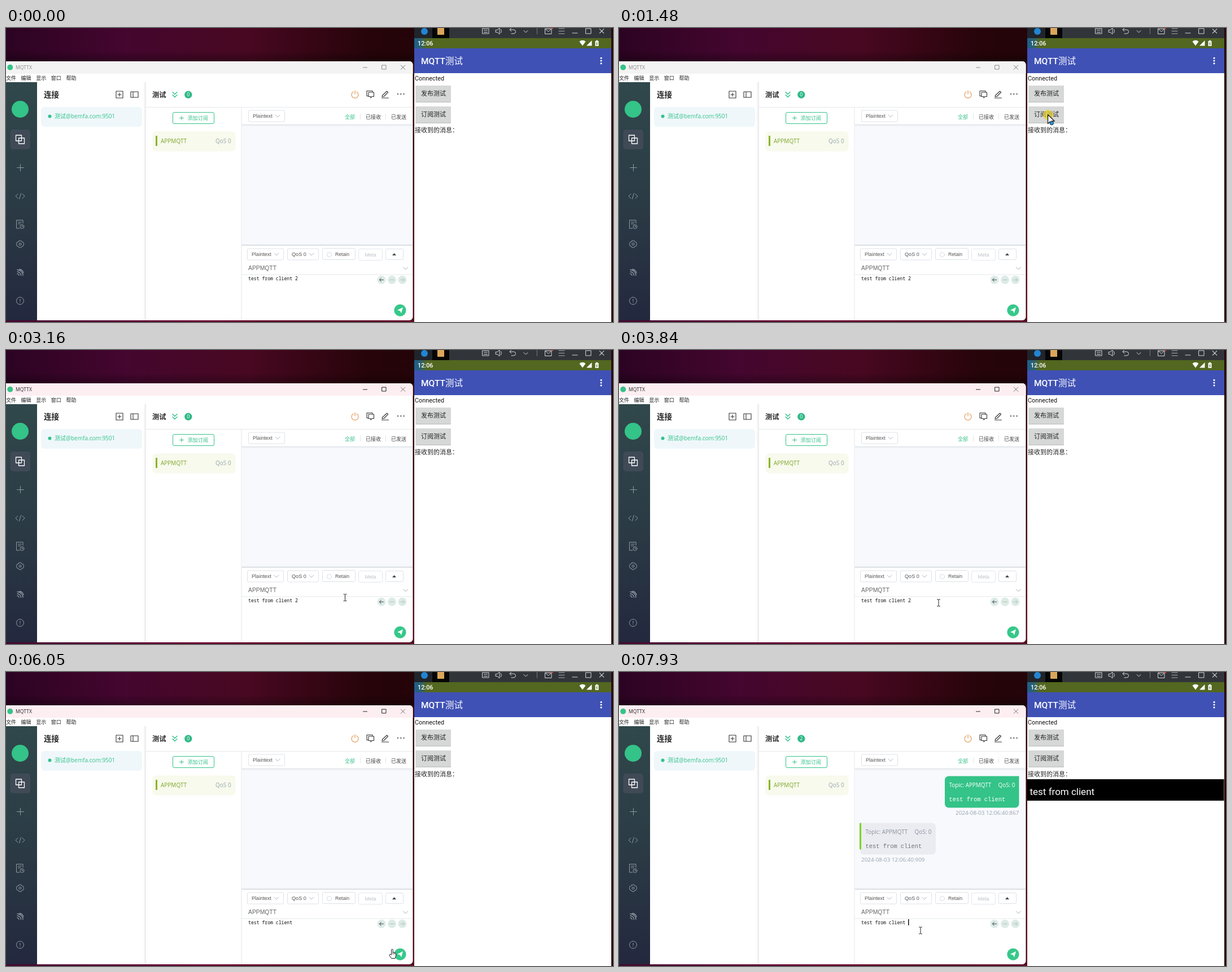
Recreate the animation shown at these times as an HTML page with a canvas. Size 1075 by 521 pixels, loop 8000 ms.

```html
<!DOCTYPE html>
<html lang="zh">
<head>
<meta charset="utf-8">
<title>MQTT</title>
<style>
html, body { margin: 0; width: 100%; height: 100%; overflow: hidden; background: #2a0512; }
canvas { display: block; }
</style>
</head>
<body>
<canvas id="stage" width="1075" height="521"></canvas>
<script>
const c = document.getElementById('stage').getContext('2d');
const LOOP = 8000;
const CJK = '"Noto Sans CJK SC", "Noto Sans CJK", sans-serif';
const UI = '"Open Sans", ' + CJK;
const ARIAL = '"Liberation Sans", ' + CJK;
const PHONE = 'Roboto, ' + CJK;
const CODE = '"Noto Sans Mono", monospace';
const COURIER = '"Liberation Mono", monospace';
const GREEN = '#34c388', INK = '#262626', GREY = '#8f9ba3';

// ---------- drawing helpers ----------
function rect(x, y, w, h, color) {
  c.fillStyle = color;
  c.fillRect(x, y, w, h);
}
function box(x, y, w, h, r, fill, line) {
  c.beginPath();
  c.roundRect(x, y, w, h, r);
  if (fill) { c.fillStyle = fill; c.fill(); }
  if (line) { c.strokeStyle = line; c.lineWidth = 1; c.stroke(); }
}
function dot(x, y, r, color) {
  c.beginPath();
  c.arc(x, y, r, 0, 7);
  c.fillStyle = color;
  c.fill();
}
function icon(x, y, path, color, width = 1, fill) {
  c.save();
  c.translate(x, y);
  const p = new Path2D(path);
  if (fill) { c.fillStyle = fill; c.fill(p); }
  if (color) {
    c.strokeStyle = color;
    c.lineWidth = width;
    c.lineCap = c.lineJoin = 'round';
    c.stroke(p);
  }
  c.restore();
}
function text(str, x, y, size, color, family = UI, weight = 400, align = 'left') {
  c.font = `${weight} ${size}px ${family}`;
  c.fillStyle = color;
  c.textAlign = align;
  c.fillText(str, x, y);
}
function ramp(x0, y0, x1, y1, ...colors) {
  const g = c.createLinearGradient(x0, y0, x1, y1);
  colors.forEach((color, i) => g.addColorStop(i / (colors.length - 1), color));
  return g;
}

const CHEVRON = 'M-4-2L0 2 4-2';
const CROSS = 'M-3.7-3.7L3.7 3.7M3.7-3.7L-3.7 3.7';
const PLUS = 'M-6 0H6M0-6V6';

// ---------- desktop and left window ----------
function desktop() {
  rect(0, 0, 1075, 521, ramp(0, 0, 1075, 0, '#2c0322', '#45062f', '#480821', '#260409', '#210508', '#290509'));
  rect(0, 40, 723, 19, ramp(0, 40, 0, 59, 'rgba(0,0,0,0)', 'rgba(0,0,0,.3)'));
  rect(0, 518, 723, 3, ramp(0, 0, 723, 0, '#43092e', '#5a0b36', '#6b0b32', '#5c0a26', '#64102a'));
  rect(720, 59, 3, 462, ramp(0, 59, 0, 521, '#2a0508', '#3b090d', '#5a1020'));
}

function titleBar(active) {
  box(-8, 59, 728.5, 459, 6, '#fff');
  box(-8, 59, 728.5, 22, [0, 6, 0, 0], active ? '#fdeef2' : '#f3f3f3');
  const ink = active ? '#222' : '#888';
  dot(7.3, 69.8, 5, GREEN);
  text('MQTTX', 17, 73, 8.6, ink);
  icon(636, 70, 'M-3.5 0H3.5', ink);
  icon(669.5, 69.5, 'M-3.5-3.5h7v7h-7z', ink);
  icon(703, 69.7, CROSS, '#777');
  ['文件', '编辑', '显示', '窗口', '帮助'].forEach((label, i) =>
    text(label, i * 26.6, 92.3, 9, '#222', CJK));
}

function sidebar() {
  box(0, 96, 55, 422, 0, ramp(0, 96, 0, 518, '#30484b', '#2b3b45', '#23283e'));
  dot(25, 144, 15, GREEN);
  box(7.5, 180, 35.5, 35, 5, '#404a57');
  icon(25, 197.5, 'M-7.5-7.5h10v10h-10zM-2.5-2.5h10v10h-10z', '#fff', 1.3);
  icon(25.5, 247.5, PLUS, GREY);
  icon(25, 298, 'M-4-4L-8 0-4 4M4-4L8 0 4 4M1.5-5L-1.5 5', GREY);
  icon(25, 348, 'M5-2V-7.5H-6.5V7H-1M-3.5-4H2.5M-3.5-1H1M7 4A3.5 3.5 0 1 1 0 4A3.5 3.5 0 1 1 7 4M3.5 2V4.2H5', GREY);
  icon(25, 383, 'M-2-6H2L3-4 5.5-3.5 6.5 0 5.5 3.5 3 4 2 6H-2L-3 4-5.5 3.5-6.5 0-5.5-3.5-3-4ZM2 0A2 2 0 1 1-2 0A2 2 0 1 1 2 0', GREY);
  icon(25, 433, 'M-5-4.5A10 10 0 0 1 5 5.5M-5-1A6.5 6.5 0 0 1 1.5 5.5M-5 2.5A3 3 0 0 1-2 5.5M-1-5.5A9 9 0 0 1 6 1', GREY, 1.3);
  icon(25, 483.5, 'M6.5 0A6.5 6.5 0 1 1-6.5 0A6.5 6.5 0 1 1 6.5 0M0-3V.8M0 3V3.2', GREY);
}

function connections() {
  text('连接', 67, 123, 13.5, INK, CJK, 700);
  icon(201, 118, 'M-6-6H6V6H-6ZM-3 0H3M0-3V3', '#333', 1.1);
  icon(227.5, 118, 'M-6.5-5H6.5V5H-6.5ZM-2.5-5V5', '#333', 1.1);
  box(62, 140, 179, 35, 6, '#eff7fb');
  dot(77.5, 156.5, 3, GREEN);
  text('测试@bemfa.com:9501', 86, 160, 10, GREEN);
  rect(243, 96, 5, 422, ramp(243, 0, 248, 0, 'rgba(0,0,0,0)', 'rgba(0,0,0,.09)'));
}

function subscriptions(count) {
  text('测试', 259, 123, 12.2, INK, CJK, 700);
  icon(299, 115.5, CHEVRON, GREEN, 1.4);
  icon(299, 120.5, CHEVRON, GREEN, 1.4);
  dot(322.8, 118.2, 6.6, '#2fb985');
  text(count, 322.8, 121.4, 9, '#fff', UI, 400, 'center');
  icon(618, 118, 'M-3-5A6 6 0 1 0 3-5M0-7V-1', '#e29a58', 1.2);
  icon(645, 117.5, 'M-3 3H-6V-6H4V-4M-3-3.5H6.5V4H3L1 6.5V4H-3Z', '#333', 1.1);
  icon(671.5, 117.5, 'M-5 2L3-5.5 5-3.5-2.5 4-5.5 4.5ZM-6 6.5H6', '#333', 1.1);
  [694, 699.3, 704.6].forEach(x => dot(x, 117, 1.1, '#333'));
  rect(248, 140, 472, 1, '#e6e8ec');
  rect(416.5, 140, 1, 378, '#e2e5ea');
  box(295.5, 149.5, 73, 20, 2.5, '#fff', GREEN);
  icon(311, 159.5, 'M-3.5 0H3.5M0-3.5V3.5', GREEN);
  text('添加订阅', 321.5, 163, 9.1, GREEN, CJK);
  box(259.5, 183.5, 147, 35, 6, '#f7faec');
  box(265, 191, 3, 18, 0, '#8bb52a');
  text('APPMQTT', 274, 204, 10, '#7ea52a');
  text('QoS 0', 371, 204, 10, '#98a5b0');
}

function dropdown(x, y, w, label) {
  box(x + .5, y + .5, w, 20, 2, '#fff', '#dde1e8');
  text(label, x + 8, y + 13.5, 9.1, '#555', ARIAL);
  icon(x + w - 12, y + 10.5, CHEVRON, '#b3b8c2');
}

function messagePane() {
  dropdown(429, 145.5, 64, 'Plaintext');
  text('全部', 600, 160.5, 9.1, GREEN, CJK);
  text('已接收', 637, 160.5, 9, '#444', CJK);
  text('已发送', 682, 160.5, 9, '#444', CJK);
  rect(627, 151, 1, 11, '#e3e6eb');
  rect(672, 151, 1, 11, '#e3e6eb');
  rect(417.5, 172, 302.5, 213, '#f7f9fc');
  rect(417.5, 170.5, 302.5, 4, ramp(0, 170, 0, 175, '#dfe3e7', '#f7f9fc'));
  rect(417.5, 383, 302.5, 3, ramp(0, 382, 0, 386, '#f7f9fc', '#d7dbdf'));
}

function composer(draft) {
  dropdown(427, 390.5, 64, 'Plaintext');
  dropdown(498, 390.5, 55, 'QoS 0');
  box(560.5, 390.5, 58, 20, 2, '#fff', '#dde1e8');
  icon(572.5, 401.5, 'M4 0A4 4 0 1 1-4 0A4 4 0 1 1 4 0', '#d5d9e0');
  text('Retain', 583, 404, 8.7, '#555', ARIAL);
  box(624.5, 391.5, 42, 20, 2, '#fff', '#e3e6ee');
  text('Meta', 635.5, 405, 9, '#bcc1ca', ARIAL);
  box(672.5, 391.5, 31, 19, 2, '#fff', '#dde1e8');
  icon(687.5, 401, 'M-3.5 2L0-2 3.5 2Z', null, 1, '#444');
  text('APPMQTT', 429, 429, 10.35, '#666', ARIAL);
  icon(707.5, 426, CHEVRON, '#a5abb4');
  rect(417.5, 436.5, 302.5, 1, '#e4e7eb');
  text(draft, 429, 446.5, 8.15, '#111', CODE);
  [665, 683.5, 702].forEach(x => dot(x, 446.3, 7.5, '#dcebe6'));
  icon(665, 446.3, 'M3.5 0H-3.5M-.7-3L-3.5 0-.7 3', '#445');
  icon(683.5, 446.3, 'M-3.5 0H3.5', '#aebfb9');
  icon(702, 446.3, 'M-3.5 0H3.5M.7-3L3.5 0 .7 3', '#b3c2bd');
  dot(698, 500.3, 10.6, '#36c88a');
  icon(698, 500, 'M-5 0L5-5 2 5.5 0 1.5Z', null, 1, '#fff');
}

function message(x, y, w, sent, stamp) {
  const ink = sent ? '#fff' : '#8b919b';
  box(x, y, w, 56, sent ? [7, 0, 7, 7] : [0, 7, 7, 7], sent ? GREEN : '#ebecf2');
  if (!sent) box(x - 1, y, 3, 47, 1, '#7dd31c');
  const left = x + (sent ? 7.5 : 9.5);
  text('Topic: APPMQTT', left, y + 19.5, 9.9, ink);
  text('QoS: 0', left + 87, y + 19.5, 9.9, ink);
  text('test from client', left, y + 44, 10.4, sent ? '#fff' : '#6f7378', COURIER);
  text('2024-08-03 12:06:40:' + stamp, sent ? 708.5 : 429, y + 68, 9.85, '#98a2b0', UI, 400, sent ? 'right' : 'left');
}

// ---------- phone ----------
function phone(received) {
  rect(723, 0, 349, 521, '#fff');
  rect(723, 0, 349, 18, '#31353a');
  rect(723, 0, 32, 18, '#20242b');
  rect(755, 0, 30, 18, '#050505');
  dot(741, 6, 6, '#2385d2');
  rect(764, 0, 12, 12, '#dba65c');
  const light = '#d5d8db';
  icon(849.5, 5.5, 'M-5.5-4.5H5.5V4.5H-5.5ZM-3-1.5H3M-3 2H3', light);
  icon(873, 5.5, 'M-5.5-2H-3L1-5.5V5.5L-3 2H-5.5ZM3.5-3A5 5 0 0 1 3.5 3', light);
  icon(897, 5.5, 'M-2-5.5L-5-2.5-2 .5M-5-2.5H2A3.5 3.5 0 0 1 2 4.5H-2', light);
  icon(920.5, 6, 'M-3.5-1.5L0 2 3.5-1.5', light);
  rect(940, 0, 1, 11, '#777');
  icon(960.5, 5.5, 'M-5.5-4H5.5V5H-5.5ZM-5.5-4L0 1 5.5-4', light);
  dot(967, .5, 1.8, '#d64646');
  icon(984, 5.5, 'M-5-4.5H5M-5 0H5M-5 4.5H5', '#a9adb1');
  icon(1007.5, 9, 'M-4.5 0H4.5', light);
  icon(1031.5, 5.5, 'M-4.5-4.5H4.5V4.5H-4.5Z', light);
  icon(1055, 5.5, CROSS, light, 1.1);

  rect(723, 18, 349, 18, '#536720');
  rect(723, 18, 22, 18, ramp(723, 0, 745, 0, '#1d5e8e', '#2c6171', '#536720'));
  text('12:06', 729, 31.3, 10.8, '#fff', PHONE, 500);
  icon(1021, 27, 'M-5.5-3A8 8 0 0 1 5.5-3L0 4.5Z', null, 1, '#fff');
  icon(1033, 27, 'M4.5-5V4.5H-5Z', null, 1, '#fff');
  icon(1046.5, 27, 'M-3-4H-1.3V-5.3H1.3V-4H3V5H-3Z', null, 1, '#fff');
  icon(1046.5, 27, 'M.5-2L-1 1H1L-.5 3.5', '#536720', .9);

  rect(723, 36, 349, 44, '#3f51b5');
  text('MQTT测试', 735, 64, 15.5, '#fff', PHONE, 500);
  [53.3, 58, 62.8].forEach(y => dot(1054, y, 1.6, '#fff'));

  text('Connected', 724, 93, 10.85, '#111', PHONE);
  [['发布测试', 102], ['订阅测试', 139]].forEach(([label, y]) => {
    box(725, y, 63, 30, 1.5, '#c2c2c2');
    box(725, y, 63, 28.7, 1.5, '#d6d7d7');
    text(label, 735, y + 18.4, 11, '#222', CJK);
  });
  text('接收到的消息：', 724, 185, 11, '#222', CJK);
  if (received) {
    rect(723, 190, 348.5, 38, '#000');
    text('test from client', 727.5, 217.7, 17, '#fff', PHONE);
  }
}

// ---------- pointer ----------
// Each move: first step time, last step time, number of steps, destination.
const MOVES = [
  [70, 70, 1, 1006, 465], [240, 240, 1, 940, 357],
  [650, 1010, 5, 771, 168], [1160, 1480, 4, 759, 153],
  [1950, 2230, 4, 850, 252], [2390, 2390, 1, 868, 320],
  [2510, 2510, 1, 743, 374], [2630, 2630, 1, 686, 402],
  [2780, 3510, 10, 572, 451], [3600, 3840, 3, 566, 448],
  [4930, 5300, 5, 683, 498], [5460, 5460, 1, 684, 499],
  [6110, 6210, 2, 575, 285], [7080, 7080, 1, 572, 260],
  [7170, 7450, 4, 534, 457], [7610, 7610, 1, 538, 459],
  [7680, 7740, 2, 534, 458]
];

function pointerAt(t) {
  let x = 1006, y = 465;
  for (const [start, end, steps, toX, toY] of MOVES) {
    if (t < start) break;
    const gap = (end - start) / Math.max(1, steps - 1) || 1;
    const k = Math.min(1, (Math.floor((t - start) / gap + 1e-6) + 1) / steps);
    const ease = k * (2 - k);
    x += (toX - x) * ease;
    y += (toY - y) * ease;
  }
  return [x, y];
}

function pointer(t) {
  if (t < 70 || (t >= 4770 && t < 4930)) return;
  const [x, y] = pointerAt(t);
  if (x > 722) {
    icon(x, y, 'M.5.5V16.5L4.5 13 7 18.5 9.5 17.3 7.2 12H12.3Z', '#222', 1.4, '#fff');
    dot(x + 7.3, y + 15.5, 3.6, '#17374d');
    dot(x + 7.3, y + 15.5, 2.7, '#2c8fc8');
  } else if (x > 670 && y > 480) {
    icon(x, y, 'M-1.5 2V-7Q0-9 1.2-7V-2Q3-3 4-1.5 6-2 6.5 0V4L5 8.5H-1.5L-5 3Q-5 0-1.5 2M1.2-2V1M4-1.5V1', '#222', 1, '#fff');
  } else if (y > 437) {
    icon(x, y, 'M-2.5-6H-.7L0-5.3.7-6H2.5M0-5.3V5.3M-2.5 6H-.7L0 5.3.7 6H2.5', '#222');
  } else {
    icon(x, y, 'M.5.5V11.5L3 9.3 4.8 13.5 6.4 12.8 4.7 8.8H8Z', '#333', 1, '#fff');
  }
}

const CARET_ON = [[3600, 3840], [4250, 4770], [5300, 5770], [7740, LOOP]];

function caret(t, draft) {
  if (!CARET_ON.some(([from, to]) => t >= from && t < to)) return;
  c.font = `400 8.15px ${CODE}`;
  rect(Math.round(429 + c.measureText(draft).width), 438, 1.5, 11, '#111');
}

function draftAt(t) {
  const base = 'test from client';
  if (t < 4250) return base + ' 2';
  return t < 4310 || t >= 7930 ? base + ' ' : base;
}

function render(t) {
  const draft = draftAt(t);
  const sent = t >= 6110, echoed = t >= 6690;
  desktop();
  titleBar(t >= 3100);
  sidebar();
  connections();
  subscriptions(sent + echoed);
  messagePane();
  if (sent) message(577, 184.5, 131.5, true, '867');
  if (echoed) message(427, 267.5, 134, false, '909');
  composer(draft);
  caret(t, draft);
  phone(t >= 6210);
  if (t >= 1370 && t < 1630) dot(760, 154, 9, 'rgba(232,211,38,.72)');
  pointer(t);
}

const begin = performance.now();
function tick() {
  render((performance.now() - begin) % LOOP);
  requestAnimationFrame(tick);
}
tick();
</script>
</body>
</html>
```
